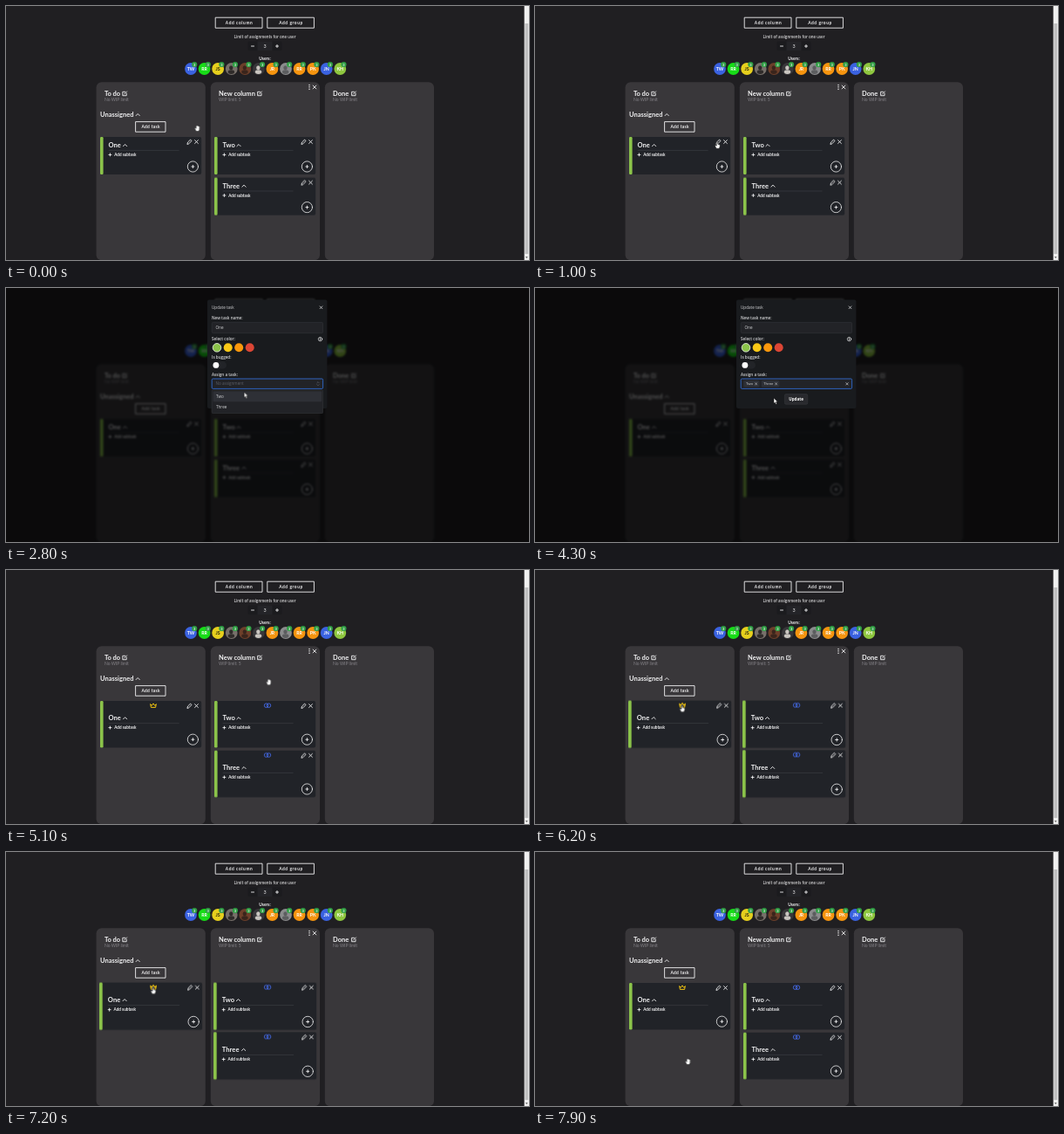
Animation, 600 px wide and 291 px high, one loop 8 s. Source, as an HTML page:

```html
<!DOCTYPE html>
<html lang="en">
<head>
<meta charset="utf-8">
<title>Task board</title>
<style>
html, body { margin: 0; height: 100%; overflow: hidden; background: #201f22; }
svg { display: block; width: 100vw; height: 100vh; }
text { font-family: Lato, sans-serif; font-size: 4.9px; fill: #f1f1f2; }
.head { font-size: 7.5px; font-weight: 700; }
.note { font-size: 5px; fill: #858388; }
.btn { font-size: 4.8px; font-weight: 700; letter-spacing: .6px; }
.mid { text-anchor: middle; }
.line { fill: none; stroke: #f1f1f2; stroke-width: .9; stroke-linecap: round; stroke-linejoin: round; }
.form text { font-family: "Open Sans", "Noto Sans", sans-serif; font-size: 4.6px; fill: #d3d4d6; }
.form .label { font-weight: 600; }
.form .dim { fill: #5c5f66; }
.field { fill: #222327; stroke: #34363b; stroke-width: .6; }
.chip { fill: #2e3036; }

/* One loop is 8 s: 1% = 80 ms */
.board, .bar, .modal, .focus, .active, .empty, .list2, .list1, .chipA, .chipB,
.linked, .push, .tall, .grab, .point, .arrow { animation: 8s step-end infinite; }
.board { animation-name: board; }
.bar { animation-name: bar; }
.modal { animation-name: modal; }
.focus { animation-name: focus; }
.active { animation-name: active; }
.empty { animation-name: empty; }
.list2 { animation-name: list2; }
.list1 { animation-name: list1; }
.chipA { animation-name: chipA; }
.chipB { animation-name: chipB; }
.linked { animation-name: linked; }
.push { animation-name: push; }
.tall { animation-name: tall; }
.grab { animation-name: grab; }
.point { animation-name: point; }
.arrow { animation-name: arrow; }
.pulse { transform-box: fill-box; transform-origin: center; animation: pulse 8s linear infinite; }
.cursor { animation: travel 8s ease-in-out infinite; }

@keyframes board { 0% { filter: none } 17.3% { filter: blur(.9px) } 63.4%, to { filter: none } }
@keyframes bar { 0% { opacity: 1 } 17.3% { opacity: 0 } 63.4%, to { opacity: 1 } }
@keyframes modal { 0% { opacity: 0 } 17.3% { opacity: 1 } 62.3% { opacity: .5 } 63.4%, to { opacity: 0 } }
@keyframes focus { 0% { opacity: 1 } 32.3%, to { opacity: 0 } }
@keyframes active { 0% { opacity: 0 } 32.3%, to { opacity: 1 } }
@keyframes empty { 0% { opacity: 1 } 42.3%, to { opacity: 0 } }
@keyframes list2 { 0% { opacity: 0 } 32.3% { opacity: 1 } 42.3%, to { opacity: 0 } }
@keyframes list1 { 0% { opacity: 0 } 42.3% { opacity: 1 } 48.6%, to { opacity: 0 } }
@keyframes chipA { 0% { opacity: 0 } 42.3%, to { opacity: 1 } }
@keyframes chipB { 0% { opacity: 0 } 48.6%, to { opacity: 1 } }
@keyframes linked { 0% { opacity: 0 } 62.3%, to { opacity: 1 } }
@keyframes push { 0% { transform: none } 62.3%, to { transform: translateY(10.2px) } }
@keyframes tall { 0% { height: 43px } 62.3%, to { height: 53.4px } }
@keyframes grab { 0% { opacity: 1 } 11.8% { opacity: 0 } 62.3% { opacity: 1 } 74.6% { opacity: 0 } 91.4%, to { opacity: 1 } }
@keyframes point { 0% { opacity: 0 } 11.8% { opacity: 1 } 17.3% { opacity: 0 } 58% { opacity: 1 } 62.3% { opacity: 0 } 74.6% { opacity: 1 } 91.4%, to { opacity: 0 } }
@keyframes arrow { 0% { opacity: 0 } 17.3% { opacity: 1 } 58%, to { opacity: 0 } }
@keyframes pulse {
  0%, 75.6% { transform: scale(1) }
  81.9% { transform: scale(1.055) }
  88.1% { transform: scale(1) }
  91.6% { transform: scale(1.03) }
  93.8%, to { transform: scale(1) }
}
@keyframes travel {
  0%, 5.6% { transform: translate(219.5px, 140px) }
  12.3%, 17.8% { transform: translate(209px, 155px) }
  23.7%, 26.6% { transform: translate(232px, 143px) }
  31.2%, 32.6% { transform: translate(281px, 110px) }
  36.2%, 39.2% { transform: translate(271px, 122px) }
  43.5%, 51.6% { transform: translate(274px, 122.5px) }
  53.5%, 54% { transform: translate(274px, 126px) }
  59.8%, 62.2% { transform: translate(300.5px, 127px) }
  63%, 66.5% { transform: translate(301.5px, 128.3px) }
  75.4%, 90.4% { transform: translate(168.6px, 154.3px) }
  93.6% { transform: translate(172px, 110px) }
  98.4%, to { transform: translate(175.5px, 240px) }
}
</style>
</head>
<body>
<svg viewBox="0 0 600 291" preserveAspectRatio="none">
  <defs>
    <path id="x" class="line" d="M-1.9-1.9 1.9 1.9M1.9-1.9-1.9 1.9"/>
    <path id="up" class="line" d="M-2.1 1 0-1.1 2.1 1"/>
    <path id="plus" class="line" d="M-1.5 0h3M0-1.5v3"/>
    <path id="pencil" class="line" d="M-2.5 2.5-2 .5 1.1-2.5 2.5-1.1-.6 2Z"/>
    <g id="edit" class="line">
      <path d="M.4-1.9h-2.8v4.4h4.4V-.2"/>
      <path d="M-.6.8 2.4-2.3"/>
    </g>
    <path id="crown" fill="none" stroke="#f2c511" stroke-width="1" stroke-linejoin="round"
      d="M-3.3-1.6-1.7.1 0-2.3 1.7.1 3.3-1.6 2.6 2.2h-5.2Z"/>
    <g id="link" fill="none" stroke="#4468e0" stroke-width=".95">
      <circle cx="-1.4" r="2.3"/><circle cx="1.4" r="2.3"/>
    </g>
  </defs>

  <rect width="600" height="291" fill="#201f22"/>
  <g class="board" id="board">
    <g class="line">
      <rect x="240.6" y="13.2" width="53.4" height="12"/>
      <rect x="300.2" y="13.2" width="53.2" height="12"/>
    </g>
    <text class="btn mid" x="267.6" y="21">Add column</text>
    <text class="btn mid" x="327" y="21">Add group</text>
    <text class="mid" x="297" y="37.2">Limit of assignments for one user</text>
    <rect x="277.5" y="40.5" width="39" height="10.5" rx="1.5" fill="#1b1b1e"/>
    <rect x="288.5" y="40.5" width="17" height="10.5" fill="#242428"/>
    <path class="line" d="M281.5 46h3"/>
    <text class="mid" x="297" y="48" style="font-size:5.4px">3</text>
    <use href="#plus" x="311" y="46"/>
    <text class="mid" x="297" y="61.6" font-weight="700">Users:</text>
  </g>

  <g class="bar">
    <rect x="594.6" width="5.4" height="291" fill="#f0f0f0"/>
    <rect x="595.4" y="20" width="3.8" height="264" fill="#bfbfc0"/>
    <path d="M595.9 287.2h2.8l-1.4 1.7Z" fill="#555"/>
  </g>

  <g class="modal form">
    <rect width="600" height="291" fill="#000" opacity=".66"/>
    <rect x="231" y="13.4" width="137.4" height="124.6" rx="2" fill="#191b1e"/>
    <text x="236" y="24.2">Update task</text>
    <rect class="focus" x="357.2" y="18" width="8.6" height="8.6" rx="1.5" fill="#16243b" stroke="#2f6fdb"/>
    <use href="#x" transform="translate(361.5 22.3) scale(.75)"/>
    <text class="label" x="236" y="36.4">New task name:</text>
    <rect class="field" x="236.2" y="39.4" width="127.4" height="12.2" rx="1.2"/>
    <text x="240.5" y="47.2">One</text>
    <text class="label" x="236" y="60.2">Select color:</text>
    <g class="line" style="stroke-width:.7">
      <circle cx="360.5" cy="58.6" r="2.2"/>
      <path d="M360.5 58.4v1.2M360.5 57.3v.1"/>
    </g>
    <circle cx="242" cy="68.3" r="4.8" fill="#8bc34a" stroke="#e4ecd9" stroke-width=".9"/>
    <circle cx="254.7" cy="68.3" r="5" fill="#fbc916"/>
    <circle cx="267.2" cy="68.3" r="5" fill="#fb980c"/>
    <circle cx="279.7" cy="68.3" r="5" fill="#dc4635"/>
    <text class="label" x="236" y="81.4">Is bugged:</text>
    <rect x="236.6" y="84.2" width="16.4" height="8.4" rx="4.2" fill="#222428"/>
    <circle cx="240.9" cy="88.4" r="3.4" fill="#fff"/>
    <text class="label" x="236" y="101.2">Assign a task:</text>
    <rect class="field" x="236.2" y="104" width="127.4" height="11.4" rx="1.2"/>
    <rect class="active" x="236.2" y="104" width="127.4" height="11.4" rx="1.2" fill="none" stroke="#2d66c8" stroke-width=".9"/>
    <g class="empty">
      <text class="dim" x="240.5" y="111.3">No assignment</text>
      <path class="line" style="stroke:#6b6e75;stroke-width:.6" d="M356.8 108.8 358 107.6 359.2 108.8M356.8 110.6 358 111.8 359.2 110.6"/>
    </g>
    <g class="chipA">
      <rect class="chip" x="239.4" y="106" width="18" height="7.5" rx="1"/>
      <text x="242" y="111.2" style="font-size:4.2px">Two</text>
      <use href="#x" transform="translate(253.6 109.8) scale(.55)"/>
      <use href="#x" transform="translate(358 109.8) scale(.65)"/>
    </g>
    <g class="chipB">
      <rect class="chip" x="259.8" y="106" width="20.6" height="7.5" rx="1"/>
      <text x="262.2" y="111.2" style="font-size:4.2px">Three</text>
      <use href="#x" transform="translate(276.6 109.8) scale(.55)"/>
    </g>
    <rect x="286.4" y="121.6" width="26.4" height="11.6" rx="1.5" fill="#28292d" stroke="#3a3c41" stroke-width=".5"/>
    <text class="mid" x="299.6" y="128.9" style="font-weight:700;fill:#fff">Update</text>
    <g class="list2">
      <rect class="field" x="236.2" y="117" width="127.4" height="26.6" rx="1.2"/>
      <rect class="chip" x="237.6" y="118.4" width="124.6" height="11.8" rx="1"/>
      <text x="241" y="126">Two</text>
      <text x="241" y="138">Three</text>
    </g>
    <g class="list1">
      <rect class="field" x="236.2" y="117" width="127.4" height="13.4" rx="1.2"/>
      <rect class="chip" x="237.6" y="118.2" width="124.6" height="11" rx="1"/>
      <text x="241" y="125.5">Three</text>
    </g>
  </g>

  <g class="cursor" fill="#fff" stroke="#111" stroke-width=".5" stroke-linejoin="round">
    <path class="grab" d="M-1.4 3.6-3-.1-2.2-.7-1.2.3-1.6-2.3-.7-2.6-.2-3.4.6-2.7 1.4-2.9 1.7-2 2.6-1.8 2.4 1.6 1.6 3.6Z"/>
    <path class="point" d="M-.7.7Q0-.5.7.7V3.2L3.2 4V6L2.3 8.2H-1L-2.6 5-1.8 4.4-.7 5.2Z"/>
    <path class="arrow" d="M0 0V6.2L1.4 5 2.4 7.3 3.5 6.8 2.5 4.6H4.3Z"/>
  </g>
</svg>
<script>
const board = document.getElementById('board');
const use = (id, x, y, extra = '') => `<use href="#${id}" transform="translate(${x} ${y})" ${extra}/>`;

// fill and initials, or two tones for a picture
const users = [
  ['#3a62e0', 'TW'], ['#17dc17', 'RR'], ['#e6cf1d', 'JS', '#26240c'],
  ['#77706a', '', '#2f2b2a'], ['#6d3f2a', '', '#3a251c'], ['#38373a', '', '#c9c5c0'],
  ['#f5940f', 'JR'], ['#8b8c8d', '', '#5c5d5f'], ['#f5940f', 'RR'],
  ['#f5940f', 'PK'], ['#3a62e0', 'JN'], ['#8ec63f', 'KH']
];

function avatar([fill, name, tone = '#fff'], i) {
  const inner = name
    ? `<text class="mid" y="1.9" style="font-size:5.2px;font-weight:700;fill:${tone}">${name}</text>`
    : `<ellipse cx="-.5" cy="-1.2" rx="2.2" ry="2.5" fill="${tone}"/><ellipse cx="-.3" cy="3.6" rx="3.7" ry="2.4" fill="${tone}"/>`;
  return `<g transform="translate(${212 + i * 15.57} 72)">
    <circle r="6.9" fill="${fill}"/>${inner}
    <circle cx="4.2" cy="-5" r="3.1" fill="#2f9e44"/>
    <text class="mid" x="4.2" y="-3.5" style="font-size:4px;font-weight:700">3</text></g>`;
}

function column(x, title, note, editX) {
  return `<rect x="${x}" y="87.3" width="125.2" height="204" rx="6" fill="#39373a"/>
    <text class="head" x="${x + 9.3}" y="102.8">${title}</text>${use('edit', editX, 100.2)}
    <text class="note" x="${x + 9.3}" y="109.2">${note}</text>`;
}

function card(x, y, title, upX, icon, cls = '') {
  return `<g transform="translate(${x} ${y})"><g class="${cls}"><g class="pulse">
    <rect class="tall" width="116.2" height="43" rx="2" fill="#212328"/>
    <rect class="tall" width="3.6" height="43" rx="1.2" fill="#8bc34a"/>
    ${use('pencil', 102.5, 5.6)}${use('x', 110.5, 5.6)}
    <g class="linked">${use(icon, 61, 5.2)}</g>
    <g class="push">
      <text class="head" x="9.6" y="12.2">${title}</text>${use('up', upX, 9.6)}
      <path d="M9.6 15.4h81" stroke="#3c3e43" stroke-width=".7"/>
      ${use('plus', 11.4, 20.4)}
      <text x="16.2" y="22.2" style="font-size:4.6px;font-weight:700">Add subtask</text>
      <circle class="line" cx="106.4" cy="34" r="6.1" style="stroke-width:.8"/>
      ${use('plus', 106.4, 34, 'stroke-width="1"')}
    </g></g></g></g>`;
}

board.insertAdjacentHTML('beforeend', [
  ...users.map(avatar),
  column(103.6, 'To do', 'No WIP limit', 136.2),
  column(234.8, 'New column', 'WIP limit: 5', 291),
  column(365.8, 'Done', 'No WIP limit', 399),
  [90.4, 92.8, 95.2].map(y => `<circle cx="348" cy="${y}" r=".75" fill="#f1f1f2"/>`).join(''),
  use('x', 354, 92.9),
  `<text class="head" x="108" y="127.2">Unassigned</text>${use('up', 151.2, 124.6)}
   <rect class="line" x="149" y="132.6" width="34" height="11.6"/>
   <text class="btn mid" x="166.2" y="140.2" style="letter-spacing:.35px">Add task</text>`,
  card(108, 150, 'One', 28.6, 'crown'),
  card(239, 150, 'Two', 28, 'link'),
  card(239, 196.6, 'Three', 34, 'link', 'push')
].join(''));
</script>
</body>
</html>
```
